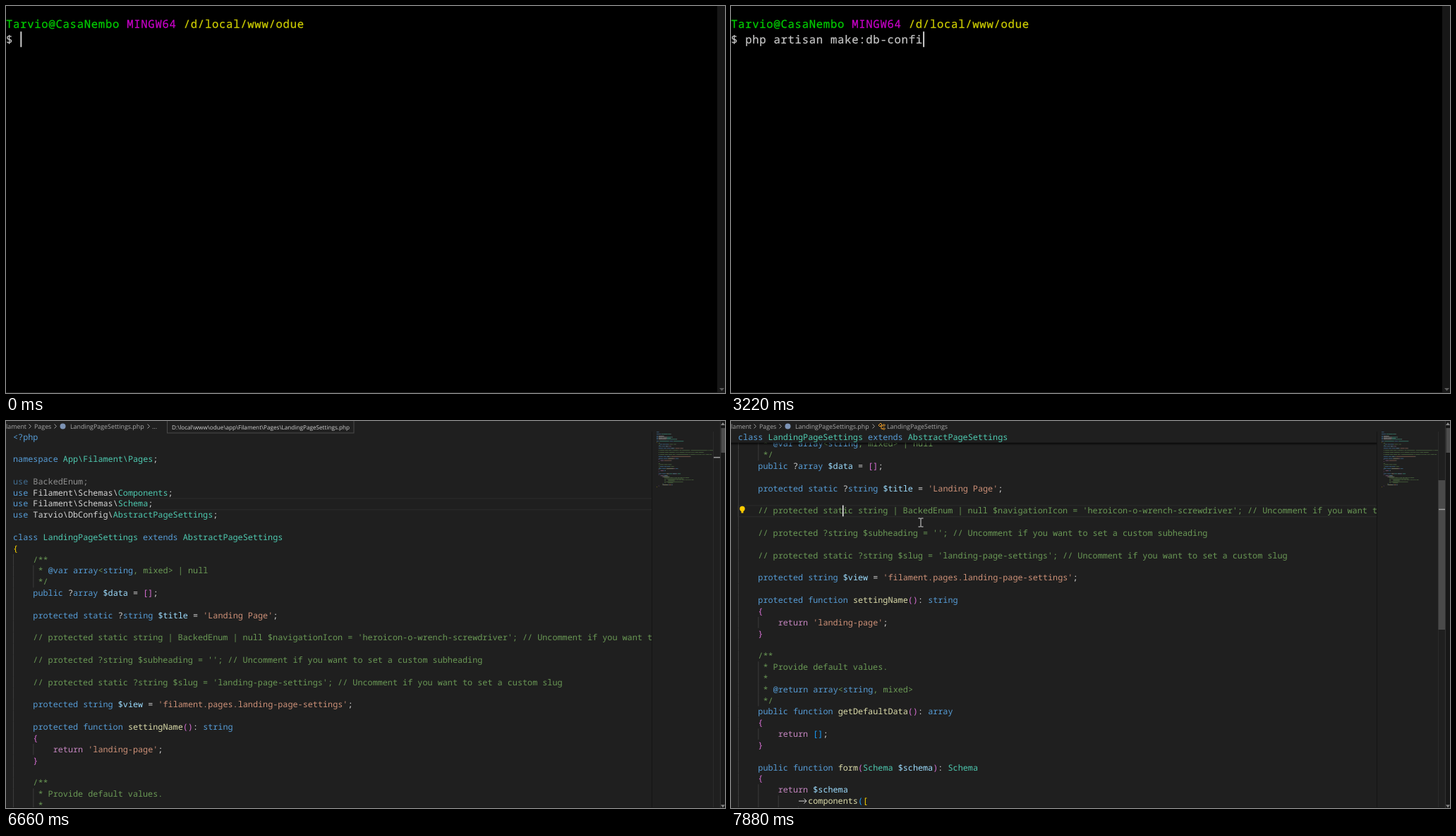
An HTML page that plays this animation: 1019 px wide and 549 px high, repeating every 8 s.

```html
<!DOCTYPE html>
<html lang="en">
<head>
<meta charset="utf-8">
<title>Terminal and editor</title>
<style>
  html, body { margin: 0; width: 100%; height: 100%; overflow: hidden; background: #000; }
  svg { display: block; width: 100%; height: 100%; }
  text { white-space: pre; text-rendering: geometricPrecision; }
  #term text {
    font: 500 15.6px "Noto Sans Mono", monospace; letter-spacing: .71px;
    color: #c4c4c4; stroke-width: .25;
  }
  #term text, #term tspan { fill: currentColor; stroke: currentColor; }
  #term .b { font-weight: 700; color: #fff; }
  #term .g { color: #00cc00; }
  #term .m { color: #c800c8; }
  #term .y { color: #cccc00; }
  #code text, #sticky text { font: 11.8px "Noto Sans Mono", monospace; fill: #d4d4d4; }
  #crumbs text { font: 8.9px "Open Sans", sans-serif; fill: #a9a9a9; }
  #tip text { font: 8.2px "Open Sans", sans-serif; fill: #d0d0d0; }
</style>
</head>
<body>
<svg id="stage" viewBox="0 0 1019 549">
  <defs>
    <clipPath id="view"><rect y="15" width="915.5" height="533"/></clipPath>
    <linearGradient id="shade" x2="0" y2="1">
      <stop stop-color="#000" stop-opacity=".75"/>
      <stop offset="1" stop-color="#000" stop-opacity="0"/>
    </linearGradient>
  </defs>

  <g id="term">
    <rect width="1019" height="549"/>
    <rect x="1008" width="11" height="549" fill="#171717"/>
    <rect y="548" width="1019" height="1" fill="#202020"/>
    <path d="M1011 542h7l-3.5 4z" fill="#5c5c5c"/>
    <g id="rows"></g>
    <rect id="caret" width="2" height="22" fill="#ccc"/>
  </g>

  <g id="editor">
    <rect width="1019" height="549" fill="#1f1f1f"/>
    <g clip-path="url(#view)">
      <g id="code">
        <rect id="current" x="10" width="910" height="15.8" fill="none" stroke="#2c2c2c"/>
      </g>
      <rect id="topshade" y="15" width="915" height="4" fill="url(#shade)"/>
    </g>
    <g id="sticky">
      <rect y="15" width="915" height="15.8" fill="#1f1f1f"/>
      <rect y="30.8" width="915" height="4" fill="url(#shade)"/>
    </g>
    <g id="crumbs">
      <text x="0" y="10.8">lament</text>
      <text x="40" y="10.8">Pages</text>
      <circle cx="80.5" cy="7.5" r="4" fill="#7c93b5"/>
      <text x="91" y="10.8">LandingPageSettings.php</text>
      <path d="M32.5 4.5l3 3-3 3M68.5 4.5l3 3-3 3M200.5 4.5l3 3-3 3" fill="none" stroke="#a0a0a0"/>
      <text id="dots" x="207" y="10.8">...</text>
      <g id="symbol">
        <path d="M209 6l3-3 2 2-3 3zM212 7h3M213 7v4h2M215 6l2-1.5 1.5 1.5-2 1.5zM215 11l2-1.5 1.5 1.5-2 1.5z" fill="none" stroke="#ee9d28"/>
        <text x="221" y="10.8">LandingPageSettings</text>
      </g>
    </g>
    <g id="tip">
      <rect x="228.5" y="-1" width="264.5" height="18" fill="#202020" stroke="#4a4a4a"/>
      <text x="235" y="11.6">D:\local\www\odue\app\Filament\Pages\LandingPageSettings.php</text>
    </g>
    <path d="M915.5 15v534" stroke="#141414"/>
    <g id="map" opacity=".5"></g>
    <path d="M1002.5 15v534" stroke="#2b2b2b"/>
    <rect id="thumb" x="1002.5" width="9.5" height="212" fill="#4a4a4a"/>
    <rect id="mark" x="1003" width="9" height="1.5" fill="#a0a0a0"/>
    <rect x="1012" width="7" height="549" fill="#181818"/>
    <path d="M1012.5 0v549" stroke="#333"/>
    <rect x="1013.5" y="10" width="5.5" height="35" fill="#4d4d4d"/>
    <path d="M1013 6h6l-3-4zM1013 544.5h6l-3 4z" fill="#888"/>
    <rect y="548" width="1012" height="1" fill="#181818"/>
    <path id="mouse" d="M-3.5-6h3l.5.5.5-.5h3M0-5.5v11M-3.5 6h3l.5-.5.5.5h3" fill="none" stroke="#ddd"/>
  </g>
</svg>

<script>
const $ = id => document.getElementById(id);

function add(parent, tag, attrs = {}, content = '') {
  const el = document.createElementNS('http://www.w3.org/2000/svg', tag);
  for (const key in attrs) el.setAttribute(key, attrs[key]);
  el.textContent = content;
  return parent.appendChild(el);
}
const show = (id, on) => $(id).style.display = on ? '' : 'none';

/* ---- terminal ---- */
const CELL = 10.07, ROW = 22.27;
const rowY = row => 14.4 + row * ROW;

// parts: text and class, in turn
function line(row, ...parts) {
  const el = add($('rows'), 'text', { x: 0, y: rowY(row) + 16.7 });
  for (let i = 0; i < parts.length; i += 2)
    add(el, 'tspan', { class: parts[i + 1] || '' }, parts[i]);
  return el;
}
function chevron(row) {
  return add($('rows'), 'path', {
    d: `M2.5 ${rowY(row) + 6}l4 5.5-4 5.5`, fill: 'none', stroke: '#fff', 'stroke-width': 2.6
  });
}

line(0, 'Tarvio@CasaNembo', 'g', ' ', '', 'MINGW64', 'm', ' ', '', '/d/local/www/odue', 'y');
const COMMAND = 'php artisan make:db-config', NAME = 'LandingPage';
const commandRow = line(1);
const asked = [line(3, '  What is the name of the settings page?', 'b'), chevron(4)];
const nameRow = line(4);
const created = [
  line(6, String.raw`View file : D:\local\www\odue\resources\views/filament/pages/landing-page-settings.blade.php created`, 'g'),
  line(7, 'File : D:/local/www/odue/app/Filament/Pages/LandingPageSettings.php created', 'g'),
  line(9, '     All set! If this tool saved you time, why not give it a    on Vurnel? Your support helps keep i', 'b'),
  line(10, 't alive!', 'b', ' (yes/no) [', '', 'yes', 'y', ']', ''),
  chevron(11),
  add($('rows'), 'path', {
    d: 'M40 219q-8 0-12 8l4 4q8-4 8-12zM28 226l-5 1 3-4 4-1M33 230l-1 5 3-3 1-5M27 229l-4 5 5-3',
    fill: 'none', stroke: '#fff', 'stroke-width': 1.7
  }),
  add($('rows'), 'circle', { cx: 35, cy: 224, r: 1.5, fill: '#fff' }),
  add($('rows'), 'path', { d: 'M622 221l1.3 3.7h4l-3.2 2.4 1.2 3.9-3.3-2.4-3.3 2.4 1.2-3.9-3.2-2.4h4z', fill: '#fff' })
];
const answerRow = line(11);

// typed characters after each tick
const commandKeys = [0, 1, 3, 5, 7, 9, 11, 12, 14, 16, 17, 19, 21, 22, 23, 24, 25, 26];
const nameKeys = [0, 1, 2, 3, 5, 6, 7, 9, 11];
const ASK = commandKeys.length, DONE = ASK + nameKeys.length;

function drawTerminal(tick) {
  const typed = commandKeys[Math.min(tick, ASK - 1)];
  const named = tick < ASK ? 0 : nameKeys[Math.min(tick - ASK, nameKeys.length - 1)];
  commandRow.textContent = '$ ' + COMMAND.slice(0, typed);
  nameRow.textContent = '  ' + NAME.slice(0, named);
  answerRow.textContent = tick > DONE ? '  y' : '';
  asked.forEach(el => el.style.display = tick >= ASK ? '' : 'none');
  created.forEach(el => el.style.display = tick >= DONE ? '' : 'none');

  let row = 1, col = 2 + typed;
  if (tick >= ASK) { row = 4; col = 2 + named; }
  if (tick >= DONE) { row = 11; col = tick > DONE ? 3 : 2; }
  if (tick > DONE + 1) { row = 13; col = 0; }
  $('caret').setAttribute('x', col * CELL + .2);
  $('caret').setAttribute('y', rowY(row) - .4);
  show('caret', tick !== 6);
}

/* ---- editor ---- */
const source = String.raw`<?php

namespace App\Filament\Pages;

use BackedEnum;
use Filament\Schemas\Components;
use Filament\Schemas\Schema;
use Tarvio\DbConfig\AbstractPageSettings;

class LandingPageSettings extends AbstractPageSettings
{
    /**
     * @var array<string, mixed> | null
     */
    public ?array $data = [];

    protected static ?string $title = 'Landing Page';

    // protected static string | BackedEnum | null $navigationIcon = 'heroicon-o-wrench-screwdriver'; // Uncomment if you want to set a custom navigation icon

    // protected ?string $subheading = ''; // Uncomment if you want to set a custom subheading

    // protected static ?string $slug = 'landing-page-settings'; // Uncomment if you want to set a custom slug

    protected string $view = 'filament.pages.landing-page-settings';

    protected function settingName(): string
    {
        return 'landing-page';
    }

    /**
     * Provide default values.
     *
     * @return array<string, mixed>
     */
    public function getDefaultData(): array
    {
        return [];
    }

    public function form(Schema $schema): Schema
    {
        return $schema
            ->components([
                // Add the fields of this page here, for example:
                // Components\TextInput::make('title')
                //     ->label('Title of the page shown at the top of it')
                //     ->required(),
                // Components\Textarea::make('intro')
                //     ->rows(4),
            ])
            ->statePath('data');
    }
}`.split('\n');

const ADV = 7.08, LINE = 15.83;
const lineY = n => 14.6 + (n - 1) * LINE;
const colX = col => 10 + col * ADV;
const BLUE = '#569cd6', GREEN = '#6a9955', TEAL = '#4ec9b0', PLAIN = '#d4d4d4';
const BRACKETS = ['#ffd700', '#da70d6', '#179fff'];
const KEYWORD = /^(php|namespace|use|class|extends|public|protected|static|function|array|string)$/;
let depth = 0;

// splits a line into [text, colour] pairs
function tokens(text) {
  const body = text.trim();
  if (/^(\/\/|\/?\*)/.test(body)) {
    if (!body.includes('@')) return [[text, GREEN]];
    return text.match(/@\w+|\w+|\W/g).map(w => [w, /^(@\w+|array|string)$/.test(w) ? BLUE : GREEN]);
  }
  const re = /'[^']*'|\$\w+|<\?php|\w+|\s+|./g;
  return [...text.matchAll(re)].map(({ 0: w, index }) => {
    const next = text[index + w.length];
    let color = PLAIN;
    if (w[0] === "'") color = '#ce9178';
    else if (w[0] === '$') color = '#9cdcfe';
    else if (w === 'return') color = '#c586c0';
    else if (w === '<?php' || KEYWORD.test(w)) color = BLUE;
    else if (/[([{]/.test(w)) color = BRACKETS[depth++ % 3];
    else if (/[)\]}]/.test(w)) color = BRACKETS[--depth % 3];
    else if (body.startsWith('namespace') && w !== ';') color = TEAL;
    else if (/^\w/.test(w)) color = next === '(' ? '#dcdcaa' : next === '\\' || w === 'BackedEnum' ? PLAIN : TEAL;
    return [w, color];
  });
}

function codeLine(parent, y, pairs) {
  const el = add(parent, 'text', { x: 10, y: y + 11.9 });
  for (const [text, fill] of pairs) add(el, 'tspan', { style: `fill:${fill}` }, text);
  return el;
}

source.forEach((text, i) => {
  const n = i + 1, y = lineY(n), pairs = tokens(text);
  const indent = text ? text.search(/\S/) : n > 11 ? 4 : 0;
  for (let c = 0; c < indent; c += 4)
    add($('code'), 'rect', { x: colX(c), y, width: 1, height: LINE + .1, fill: '#3b3b3b' });

  const arrow = text.trim().startsWith('->');
  const el = codeLine($('code'), y, arrow ? pairs.map(([w, c]) => [/[->]/.test(w) ? ' ' : w, c]) : pairs);
  if (text.endsWith('BackedEnum;')) el.setAttribute('opacity', .62);
  if (arrow) add($('code'), 'path', {
    d: `M${colX(indent) + 1} ${y + 8}h11m-3.5-3.5l3.5 3.5-3.5 3.5`, fill: 'none', stroke: PLAIN
  });
  if (n === 10) codeLine($('sticky'), lineY(1), pairs);

  // overview on the right
  let col = 0;
  for (const [w, fill] of pairs) {
    for (const m of w.matchAll(/\S+/g)) {
      const x = 922 + (col + m.index) * .71;
      const width = Math.min(m[0].length * .71, 1002 - x);
      if (width > 0) add($('map'), 'rect', { x, y: 15.3 + i * 1.44, width, height: .9, fill });
    }
    col += w.length;
  }
});

const click = add($('code'), 'g');
add(click, 'rect', { x: colX(21) - .7, y: lineY(19), width: 1.5, height: 15.8, fill: '#eee' });
add(click, 'circle', { cx: 16, cy: lineY(19) + 5, r: 3.7, fill: '#ffcc00' });
add(click, 'rect', { x: 14.5, y: lineY(19) + 8, width: 3, height: 3, fill: '#ffcc00' });

// time, scroll offset, mouse x, mouse y
const scrolls = [
  [6660, 0, -20, -20],
  [6860, 36, 281, 136],
  [7060, 72, 281, 136],
  [7280, 108, 281, 136],
  [7480, 144, 279, 138],
  [7680, 162, 274, 141],
  [7880, 180, 269, 144]
];

function drawEditor([time, top, mx, my]) {
  const clicked = time >= 7880, current = clicked ? 19 : 7;
  $('code').setAttribute('transform', `translate(0 ${-top})`);
  $('mouse').setAttribute('transform', `translate(${mx} ${my})`);
  $('current').setAttribute('y', lineY(current) + .4);
  $('mark').setAttribute('y', 14 + (current - 1) * 6.15);
  $('thumb').setAttribute('y', 14 + top * .389);
  click.style.display = clicked ? '' : 'none';
  show('thumb', top > 0);
  show('topshade', top > 0);
  show('sticky', top > 142);
  show('tip', top === 0);
  show('dots', !clicked);
  show('symbol', clicked);
}

/* ---- clock ---- */
const LOOP = 8000, start = performance.now();
const tickTime = i => i * 200 + (i > 15 ? 20 : 0);
let last = '';

function frame() {
  const t = (performance.now() - start) % LOOP;
  const step = scrolls.filter(s => s[0] <= t).pop();
  let tick = 0;
  while (tick < DONE + 2 && tickTime(tick + 1) <= t) tick++;
  const state = step ? 'e' + step[0] : 't' + tick;
  if (state !== last) {
    last = state;
    show('term', !step);
    show('editor', step);
    if (step) drawEditor(step);
    else drawTerminal(tick);
  }
  requestAnimationFrame(frame);
}
frame();
</script>
</body>
</html>
```
